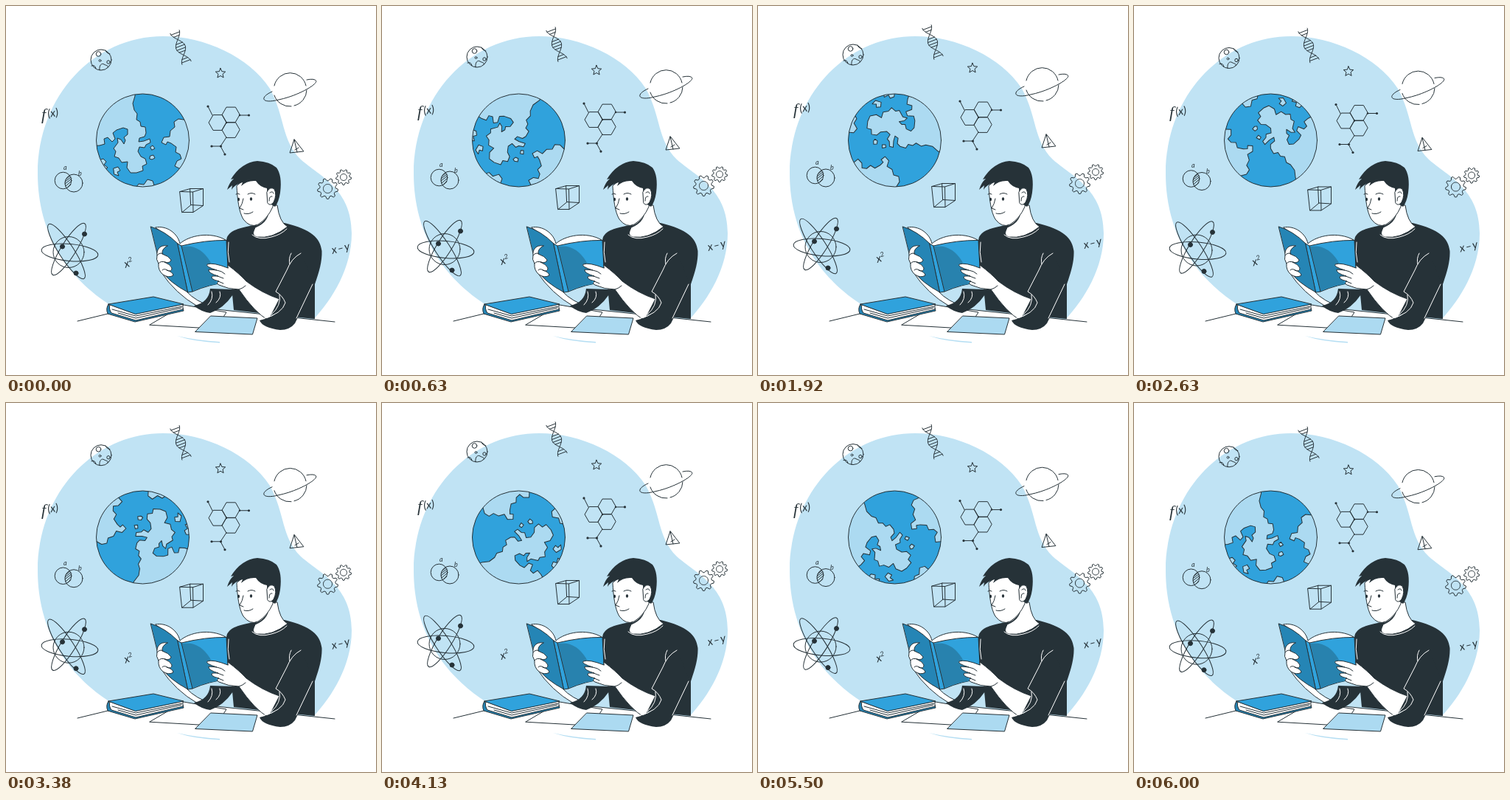
An HTML page for the animation above (6040 ms loop, 502x500 px).

```html
<!DOCTYPE html>
<html lang="en">
<head>
<meta charset="utf-8">
<title>Reading about science</title>
<style>
  html, body { margin: 0; width: 100%; height: 100%; overflow: hidden; background: #fff; }
  svg { display: block; width: 502px; height: 500px; }
  .ink { fill: none; stroke: #263238; stroke-width: 1; stroke-linejoin: round; stroke-linecap: round; }
  .white { fill: #fff; }
  .blue { fill: #30a2dc; }
  .deep { fill: #2585b5; }
  .pale { fill: #acdaf1; }
  .dark { fill: #263238; }
  .chalk { fill: none; stroke: #fff; stroke-width: 1; stroke-linecap: round; }
  text { font: italic 400 15px Lato, "Open Sans", sans-serif; fill: #263238; }
  .small { font-size: 9px; }
  .script { font: italic 22px "Liberation Serif", serif; }
</style>
</head>
<body>
<svg viewBox="0 0 502 500">
  <defs><clipPath id="disc"><circle cx="185.5" cy="182" r="63"/></clipPath></defs>

  <path fill="#c0e3f4" d="M213 41C270 41 330 69 358 112C379 150 373 181 400 208C426 231 469 248 469 308C469 355 443 397 417 425L150 425L143 406C85 370 43 310 43 227C43 122 119 41 213 41Z"/>
  <path class="white" d="M97 427L200 402L446 428L502 500H0Z"/>
  <path class="ink" d="M97 427L200 402L446 428"/>
  <path fill="#b5def3" d="M232 447Q258 453 290 455V456.5Q256 455 232 447Z"/>

  <g clip-path="url(#disc)">
    <circle class="pale" cx="185.5" cy="182" r="63"/>
    <g id="land" class="ink">
      <path class="blue" d="M175 112L175 122L172 132L174 141L178 146L177 154L182 157L183 163L189 164L190 172L188 177L181 179L180 184L187 183L195 180L196 185L190 188L188 192L181 191L179 197L183 204L189 207L191 214L185 217L186 223L177 226L169 226L164 219L165 211L157 212L153 206L147 204L149 197L146 193L152 185L151 179L156 181L160 187L162 182L160 178L165 174L165 167L159 165L150 168L145 172L148 180L144 184L138 178L133 180L134 187L127 189L110 190L100 260L250 270L250 226L235 220L229 217L232 210L238 207L236 201L230 198L231 191L224 186L219 184L217 188L211 185L214 178L222 177L223 169L229 164L228 157L234 153L255 156L255 110Z"/>
      <path class="pale" d="M119 211L132 207L136 211L133 215L138 219L130 224ZM146 220L152 218L155 223L151 225L153 230L147 228ZM196 203L200 202L202 206L198 208L195 207ZM196 191L199 189L202 193L198 195ZM174 249L180 241L187 242L192 235L199 237L203 249Z"/>
    </g>
  </g>
  <circle class="ink" cx="185.5" cy="182" r="63"/>

  <g id="floating" class="ink">
    <!-- moon -->
    <circle cx="129" cy="73" r="14"/>
    <circle cx="125.5" cy="65" r="3.3"/><circle cx="139" cy="76" r="2.2"/><circle cx="127.5" cy="74" r="1.4"/>
    <path d="M127 87C126 80 130 77 133 79S139 80 138 83M116 81Q121 79 122 85M135 60Q136 64 141 65"/>
    <!-- ringed planet -->
    <path d="M364 108A22 22 0 0 1 407 108M408 114A22 22 0 0 1 391 135M387 136A22 22 0 0 1 364 121M361 116C343 124 347 133 370 127C395 122 424 106 420.5 101Q418 98 408 100"/>
    <!-- cube -->
    <path d="M236 251.5L253.500 252L254 279.5L239 279.5ZM250 247.500L267.500 247.500L267.500 270.500L251 269.500ZM236 251.500L250 247.500M253.500 252L267.500 247.500M254 279.500L267.500 270.500M239 279.500L251 269.500"/>
    <!-- pyramid -->
    <path d="M391 181L385 199L403.500 197ZM391 181L395 198M392 195L397 192"/>
    <!-- overlapping sets -->
    <circle cx="77.500" cy="236.500" r="11.300"/><circle cx="92" cy="240" r="12"/>
    <path d="M81 235L87 230M80 238L88 232M80 241L89 234M81 244L89 237M83 246L88 242"/>
    <!-- atom -->
    <circle cx="85" cy="333.500" r="21"/>
    <ellipse cx="86.500" cy="334" rx="38.500" ry="11.500" transform="rotate(5 86.500 334)"/>
    <ellipse cx="82" cy="332.500" rx="44" ry="10" transform="rotate(57 82 332.500)"/>
    <ellipse cx="85" cy="329.500" rx="41" ry="10" transform="rotate(-58 85 329.500)"/>
    <g class="dark"><circle cx="106.500" cy="309" r="3"/><circle cx="76.500" cy="326" r="3"/><circle cx="95" cy="362" r="3"/></g>
    <!-- molecule bonds -->
    <path d="M274 136L280 148M317 148H329M299 178L291 190H279M291 190L297 201"/>
    <g class="dark" stroke="none"><circle cx="274" cy="136" r="1.600"/><circle cx="329.500" cy="148" r="1.600"/><circle cx="279" cy="190" r="1.600"/><circle cx="297" cy="201" r="1.600"/><circle cx="291.500" cy="190" r="1.600"/><circle cx="317" cy="148" r="1.200"/><circle cx="299" cy="158" r="1.200"/></g>
    <path id="shapes"/>
    <g stroke="none">
      <text class="script" transform="translate(48 154)">f</text>
      <text transform="translate(57 151) rotate(-8)">(x)</text>
      <text transform="translate(162 355) rotate(-18)">x<tspan class="small" dy="-6">2</tspan></text>
      <text transform="translate(443 336) rotate(-14)">x<tspan dx="1">–</tspan><tspan dx="1">y</tspan></text>
      <text class="small" x="78" y="222">a</text>
      <text class="small" x="98" y="229.500">b</text>
    </g>
  </g>

  <!-- closed book and papers -->
  <g class="ink">
    <path class="white" d="M195 432L241 405L299 415L285 437Z"/>
    <path class="pale" d="M278 420L341 423L334.500 445L257 441.500Z"/>
    <path class="deep" d="M139 404Q135 410 138 417L175 428L241 413L240 409L176 424L143 415Z"/>
    <path class="white" d="M141 405Q139 410 143 416L176 426L240 411V404L176 417Z"/>
    <path d="M144 411L176 420L239 407M152 416L176 423L238 409"/>
    <path class="blue" d="M139 404L200 394L241 404L176 417.500Z"/>
  </g>

  <!-- torso and head -->
  <path class="dark" d="M336 297C315 301 305 304 300 313C295 330 300 350 306 380L309 412L360 418L419 424V377C425 360 429 346 428.500 332C426 314 415 303 378 294Z"/>
  <path class="ink white" d="M341 293L336 305Q334 311 340 313Q361 316 382 299Q371 293 368 270L350 270Z"/>
  <path class="chalk" d="M334 310Q343 318 360 313Q373 310 381 302"/>
  <path class="ink white" d="M313 244C314 262 316 279 322 289Q331 301 342 296Q355 288 362 272L366 235L340 222Z"/>
  <path class="dark" d="M335 299Q347 297 356 283Q352 296 336 301Z"/>
  <path class="dark" d="M300 249Q303 239 309 234L305 235Q319 212 341 210Q358 211 367 219Q375 230 372 253Q370 266 365 272L355 266L354 247Q344 245 339 237Q327 236 319 244L321 239Q310 242 306 249L307 243Z"/>
  <path class="ink white" d="M354 252Q358 244 364 248Q368 256 363 266Q358 272 355 267Z"/>
  <path class="ink" d="M358 253Q362 250 363 254M357 264Q357 257 361 258M312 255Q315 253 317 255M328 255Q333 252 338 255M322 261Q321 268 317 274L322 276M323 281Q329 283 335 279"/>
  <g class="dark"><ellipse cx="315.500" cy="262" rx="1.600" ry="2.200"/><ellipse cx="332.500" cy="261.500" rx="1.600" ry="2.200"/></g>

  <!-- far arm -->
  <path class="ink white" d="M210 360Q230 390 260 407L270 404Q248 394 240 380L225 360Z"/>
  <path class="dark" d="M308 384L277 383Q275 402 255 406Q264 414 277 416Q295 410 308 391Z"/>
  <path class="chalk" d="M279 387Q282 397 274 405M290 387Q293 395 285 402"/>

  <!-- open book -->
  <g class="ink">
    <path class="white" d="M203 300C218 297 233 308 236 322C248 311 277 305 298 317L240 330L232 322Z"/>
    <path class="deep" d="M196.500 299Q216 305 233 322L247 388Q222 375 211 359Z"/>
    <path class="blue" d="M238 325Q271 317 299 317.500L302 374Q276 377 253 387Z"/>
    <path fill="#2882ae" stroke="none" d="M239 326Q262 322 277 346L286 377Q269 379 253 386Z"/>
    <path class="blue" d="M233 322L238 325L253 387L247 388Z"/>
    <path class="white" d="M219 325C209 323 204 330 205 338Q203 343 207 349Q206 358 213 364Q221 369 227 365Q226 360 218 358Q225 361 225 355Q223 350 215 347Q223 349 224 344Q221 339 212 336Q211 329 219 325Z"/>
    <path d="M205 338Q209 333 213 336M207 349Q209 345 216 347M212 358Q214 355 219 358"/>
    <!-- near forearm and hand -->
    <path class="white" d="M301 351Q317 363 326 373Q347 389 371 397L356 426Q337 415 316 384Q302 384 289 378Q284 375 289 373Q276 370 280 366L288 366Q274 362 275 357L286 358Q270 353 273 350Q281 347 301 355Z"/>
    <path d="M286 358Q293 359 297 363M287 366L295 369M288 373L295 376M316 384Q321 383 325 379"/>
  </g>

  <!-- near sleeve -->
  <path class="dark" d="M366 387Q375 392 379 402Q373 419 344 426Q348 436 372 439Q385 439 392 430L418 378L405 345L380 370Z"/>
  <path class="chalk" d="M400 335Q387 342 381 358L366 387Q375 392 379 402Q375 417 348 424M385 350Q383 342 387 335M371 391Q374 406 360 418M416 377L394 423M302 320Q300 334 303 347"/>
</svg>
<script>
const TURN = 2 * Math.PI, LOOP = 6040, FPS = 24, RISE = 9.6;
const land = document.getElementById('land');
const floating = document.getElementById('floating');

const polar = (x, y, r, a) => [x + r * Math.cos(a), y + r * Math.sin(a)];
const line = points => 'M' + points.map(p => p.map(v => v.toFixed(1)).join(' ')).join('L');
const ring = (n, point) => line(Array.from({ length: n }, (_, i) => point(i))) + 'Z';

const hexagon = (x, y) => ring(6, i => polar(x, y, 12, i * TURN / 6));
const star = (x, y) => ring(10, i => polar(x, y, i % 2 ? 3.2 : 7, i * TURN / 10 - TURN / 4));
const circle = (x, y, r) => ring(36, i => polar(x, y, r, i * TURN / 36));

function gear(x, y, r, teeth) {
  const outline = ring(teeth * 4, i => polar(x, y, i % 4 < 2 ? r : r * .77, (i + .5) * TURN / teeth / 4));
  return outline + circle(x, y, r * .43);
}

function helix(x, y, dx, dy) {
  const length = Math.hypot(dx, dy);
  const at = (u, side) => {
    const w = side * 6.5 * Math.cos(Math.PI * u) / length;
    return [x + dx * u - dy * w, y + dy * u + dx * w];
  };
  const steps = Array.from({ length: 31 }, (_, i) => i / 15 - 1);
  const rungs = [-.9, -.72, -.25, -.08, .1, .27, .72, .9];
  return [-1, 1].map(s => line(steps.map(u => at(u, s)))).join('') +
    rungs.map(u => line([at(u, -1), at(u, 1)])).join('');
}

document.getElementById('shapes').setAttribute('d',
  hexagon(305, 147.5) + hexagon(287, 158) + hexagon(305, 168) + star(291, 91.3) +
  gear(436.5, 247.5, 14, 9) + gear(458, 232, 10.5, 9) + helix(237, 56, 8, 21));

function draw(now) {
  const t = Math.floor(now % LOOP * FPS / 1000) / FPS * 1000 / LOOP;
  // steady rise and fall, twice per loop
  const lift = RISE * (1 - Math.abs(1 - 4 * t % 2));
  land.setAttribute('transform', `rotate(${360 * t} 185.5 182)`);
  floating.setAttribute('transform', `translate(0 ${-lift})`);
  requestAnimationFrame(draw);
}
draw(performance.now());
</script>
</body>
</html>
```
